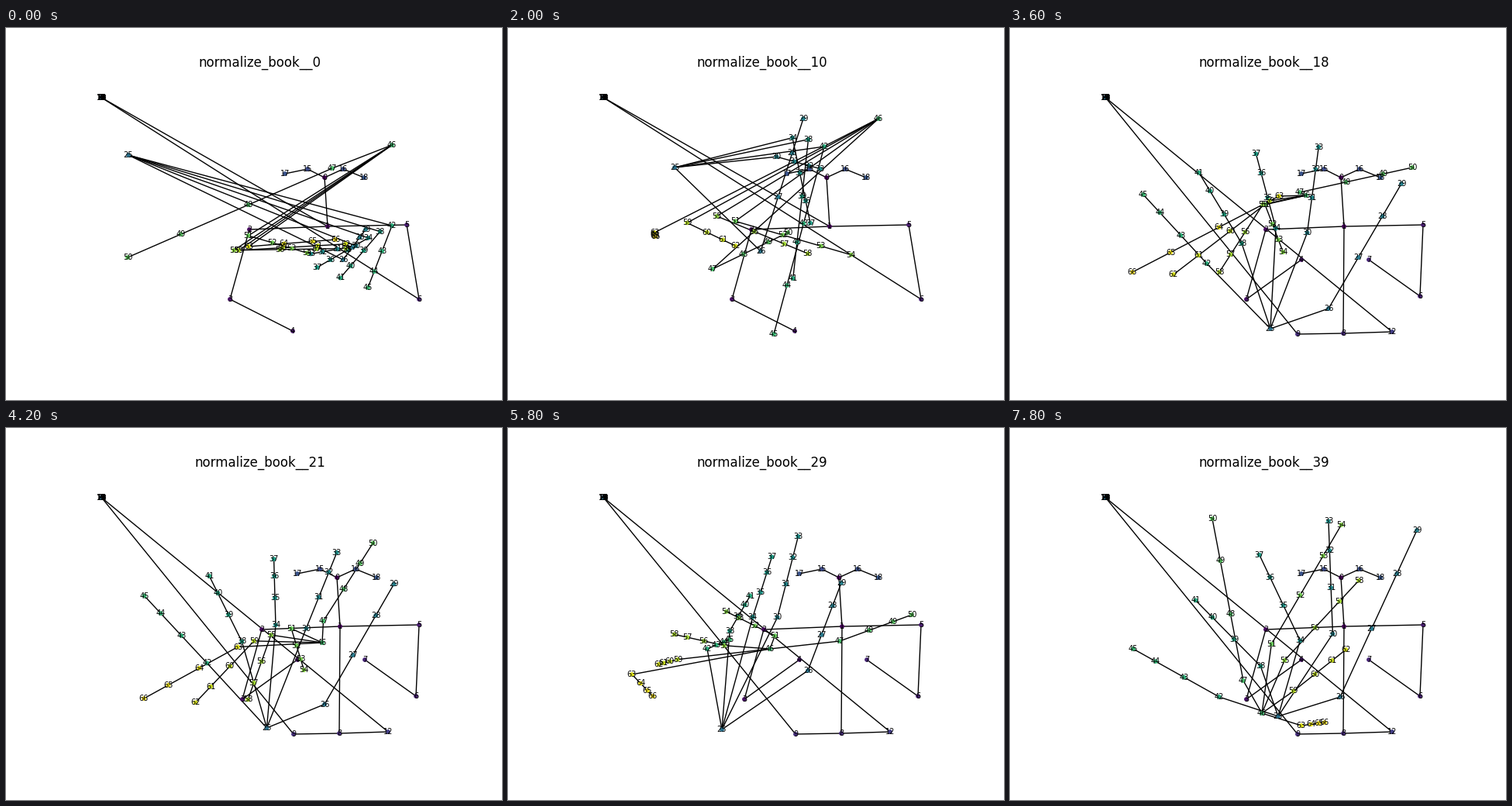
Write a matplotlib script that moves like this. It is 640 px wide and 480 px high and loops after 8000 ms.

```python
import numpy as np
import matplotlib.pyplot as plt
from matplotlib.animation import FuncAnimation
from matplotlib.collections import LineCollection

W, H, DPI = 640, 480, 100
FRAMES, STEP_MS = 40, 200
NODES = 67
LOST_SPOT = (123.5, 90)          # undetected joints collapse here
FLICKER = [7, 8, 9, 12]          # joints that are lost at times
LOST_TIMES = ((0, 3), (8, 15))

# resting body
BODY = {0: (427, 193), 1: (431, 256), 2: (330, 260), 3: (305, 350),
        4: (376, 299), 5: (533, 254), 6: (529, 346), 7: (463, 299),
        8: (430, 394), 9: (371, 395), 12: (493, 392), 15: (405, 182),
        16: (451, 182), 17: (376, 188), 18: (478, 193)}
# the body starts further left, with both forearms hanging down
SLIDE = (-16, 0)
START = {4: (-6, 92), 6: (4, 4), 7: (18, 94)}

# A hand pose: frame, wrist, then the arc of knuckles and the arc of tips.
# An arc runs from thumb to little finger: first point, last point, bulge.
LEFT = [
    (6, (158, 164), ((435, 299), (498, 255), (1, -7)), ((464, 260), (467, 335), (-73, 13))),
    (10, (215, 180), ((326, 288), (408, 153), (0, -90)), ((381, 117), (343, 395), (32, -5))),
    (18, (336, 388), ((411, 362), (254, 304), (12, -85)), ((505, 201), (172, 215), (-24, -52))),
    (24, (337, 386), ((411, 351), (265, 303), (17, -88)), ((496, 202), (185, 218), (38, -39))),
    (29, (276, 389), ((387, 313), (257, 285), (-7, -63)), ((430, 200), (286, 273), (-20, -80))),
    (39, (346, 372), ((426, 347), (270, 347), (30, -83)), ((525, 132), (159, 285), (-23, -51))),
]
RIGHT = [
    (0, (498, 151), ((421, 181), (313, 282), (-83, 63)), ((157, 296), (425, 273), (168, 0))),
    (6, (498, 129), ((277, 288), (209, 252), (53, -36)), ((342, 268), (157, 363), (146, -14))),
    (10, (478, 117), ((264, 311), (189, 264), (49, -51)), ((361, 264), (190, 269), (127, 28))),
    (18, (382, 216), ((374, 212), (347, 217), (-39, 15)), ((519, 180), (158, 315), (-78, 77))),
    (24, (434, 338), ((445, 286), (251, 348), (11, -12)), ((428, 117), (198, 383), (47, 155))),
    (29, (338, 285), ((428, 275), (160, 318), (-17, -18)), ((521, 241), (187, 346), (-159, -31))),
    (39, (325, 368), ((301, 326), (376, 384), (18, -63)), ((261, 117), (406, 380), (133, -59))),
]


def smoothstep(x):
    x = np.clip(x, 0, 1)
    return x * x * (3 - 2 * x)


def arc(first, last, bulge):
    """Five points from first to last, pushed out most at the index finger."""
    t = np.linspace(0, 1, 5)[:, None]
    bump = np.sin(np.pi * t ** 0.6)
    return np.array(first) * (1 - t) + np.array(last) * t + np.array(bulge) * bump


def hand(wrist, knuckles, tips):
    """Wrist and five fingers of four joints, the gaps shrinking outward."""
    base, end = arc(*knuckles), arc(*tips)
    reach = np.array([0, 0.41, 0.74, 1])[None, :, None]
    fingers = base[:, None] * (1 - reach) + end[:, None] * reach
    return np.vstack([wrist, fingers.reshape(-1, 2)])


def blend(poses, frame):
    """Hand between the two poses around a frame."""
    keys = [p[0] for p in poses]
    shapes = [hand(*p[1:]) for p in poses]
    at = np.interp(frame, keys, range(len(keys)))
    i = min(int(at), len(keys) - 2)
    return shapes[i] + (shapes[i + 1] - shapes[i]) * (at - i)


def pose_at(frame):
    pose = np.tile(np.array(LOST_SPOT, float), (NODES, 1))
    early = 1 - smoothstep((frame - 10) / 8)
    for joint, point in BODY.items():
        pose[joint] = np.array(point) + early * np.array(START.get(joint, SLIDE))
    if any(a <= frame < b for a, b in LOST_TIMES):
        pose[FLICKER] = LOST_SPOT
    pose[25:46] = blend(LEFT, frame)
    pose[46:67] = blend(RIGHT, frame)
    return pose


# skeleton as chains of joints
chains = [(0, 1, 8, 9, 10), (1, 2, 3, 4), (1, 5, 6, 7),
          (8, 12, 13), (0, 15, 17), (0, 16, 18)]
for wrist in (25, 46):
    chains += [(wrist, *range(k, k + 4)) for k in range(wrist + 1, wrist + 21, 4)]
edges = np.array([pair for c in chains for pair in zip(c, c[1:])])

fig = plt.figure(figsize=(W / DPI, H / DPI), dpi=DPI, facecolor="white")
ax = fig.add_axes([0, 0, 1, 1])
ax.set_xlim(0, W)
ax.set_ylim(H, 0)
ax.axis("off")

start = pose_at(0)
bones = LineCollection(start[edges], colors="black", linewidths=1, zorder=1)
ax.add_collection(bones, autolim=False)
dots = ax.scatter(*start.T, s=10, c=range(NODES), cmap="viridis", zorder=2)
labels = [ax.text(*start[n], str(n), fontsize=7, family="DejaVu Sans",
                  ha="center", va="center", zorder=3) for n in range(NODES)]
title = ax.text(328, 49.3, "", fontsize=12, family="DejaVu Sans",
                ha="center", va="baseline")


def draw(frame):
    pose = pose_at(frame)
    bones.set_segments(pose[edges])
    dots.set_offsets(pose)
    for label, point in zip(labels, pose):
        label.set_position(point)
    title.set_text(f"normalize_book__{frame}")
    return [bones, dots, title, *labels]


anim = FuncAnimation(fig, draw, frames=FRAMES, interval=STEP_MS,
                     repeat=True, repeat_delay=0)
plt.show()
```
